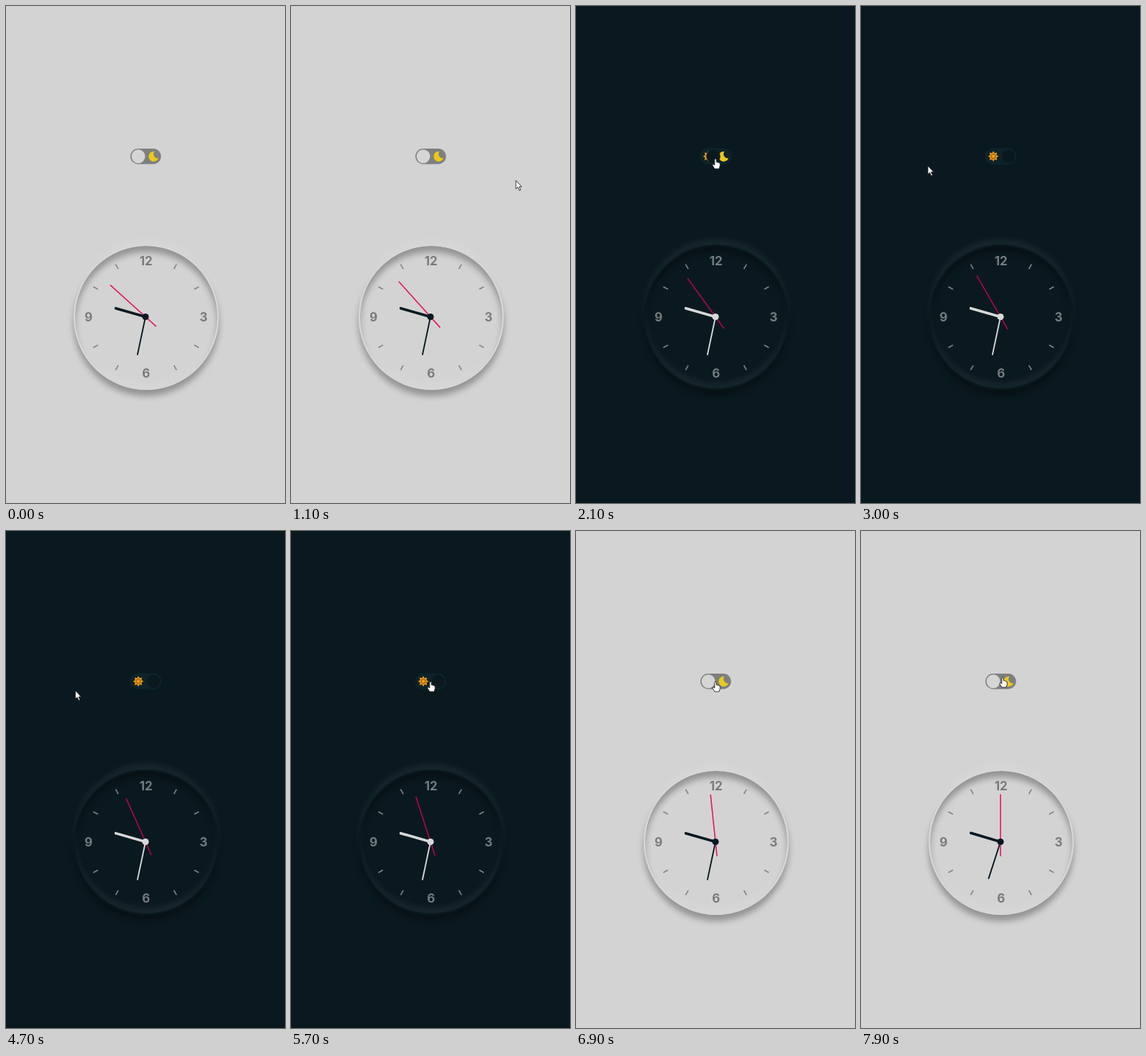
Write an HTML page that moves like this. It is 388x690 px and loops after 8000 ms.

```html
<!DOCTYPE html>
<html lang="en">
<head>
<meta charset="utf-8">
<title>Clock with theme switch</title>
<style>
  html, body { margin: 0; width: 100%; height: 100%; overflow: hidden; }
  body {
    --bg: #d3d3d3; --rim: #d8d8d8; --track: #7f7f7f; --ball: #d5d5d5; --edge: transparent;
    --hand: #091921; --second: #e2185f; --num: #7a7a7a; --tick: #858585;
    --glow: rgba(255, 255, 255, .08);
    position: relative; background: var(--bg);
  }
  body.dark {
    --bg: #0a1920; --rim: #0a1920; --track: #0d2329; --ball: #0a1920; --edge: #11282e;
    --hand: #d6d9da; --second: #b5044f; --num: #747c80; --tick: #7b8386;
    --glow: rgba(255, 250, 255, .055);
  }
  #face {
    position: absolute; left: 95.5px; top: 333px; width: 198px; height: 198px;
    margin: -2px; border: 2px solid var(--rim); border-radius: 50%; background: var(--bg);
    box-shadow: 0 -8.5px 8.5px var(--glow), inset 0 -8.5px 8.5px var(--glow),
      0 8.5px 8.5px rgba(0, 0, 0, .3), inset 0 8.5px 8.5px rgba(0, 0, 0, .3);
  }
  svg { position: absolute; left: 0; top: 0; display: block; }
  text { font: 700 17px Inter, "Open Sans", sans-serif; text-anchor: middle; fill: var(--num); }
  #ticks { stroke: var(--tick); stroke-width: 1.7; }
  #hour, #minute { stroke: var(--hand); stroke-linecap: round; }
  #arrow, #pointer { fill: #fff; stroke: #222; stroke-width: .9; stroke-linejoin: round; }
</style>
</head>
<body>
<div id="face"></div>
<svg width="388" height="690" viewBox="0 0 388 690">
  <rect x="173" y="198" width="42.6" height="21.4" rx="10.7" fill="var(--track)" stroke="var(--edge)" stroke-width=".8"/>
  <g transform="translate(184 208.7)">
    <path id="sun" fill="#f39a16"/>
    <circle r="3.1" fill="none" stroke="#704c1c" stroke-width="1"/>
  </g>
  <path d="M206.5 202A7 7 0 1 0 212 211.2A5.7 5.7 0 0 1 206.5 202Z" fill="#eac91c"/>
  <circle id="ball" cy="208.7" r="9.5" fill="var(--ball)" stroke="var(--edge)" stroke-width=".6"/>

  <g id="ticks"></g>
  <g id="numbers"></g>

  <g transform="translate(194 431.5)">
    <path id="hour" d="M0 0V-43" stroke-width="3.6"/>
    <path id="minute" d="M0 0V-53.5" stroke-width="1.9"/>
    <path id="second" d="M0 20V-66" stroke="var(--second)" stroke-width="1.6"/>
    <circle r="4.6" fill="var(--hand)"/>
  </g>

  <g id="cursor">
    <path id="arrow" d="M0 0V11.5L2.6 9.2L4.6 13.8L6.5 13L4.5 8.6H8Z"/>
    <path id="pointer" d="M-1.2 .8Q0 -.8 1.2 .8V4.8Q2.3 4.2 3 5.2Q4.2 4.6 4.8 5.8Q6.3 5.6 6.3 7V10L5 14H-1.2L-4 9.4Q-4.6 7.6 -3 7.6L-1.2 9Z"/>
  </g>
</svg>
<script>
  const LOOP = 8000, STEP = 100;
  const NIGHT = 2000, DAY = 5800, SLIDE = 300;
  const el = id => document.getElementById(id);

  const entry = { x: 390, y: 262 };
  const moves = [
    { from: 800, to: 1500, x: 194, y: 212 },
    { from: 2600, to: 3000, x: 93, y: 222 },
    { from: 4600, to: 5500, x: 194, y: 209 },
    { from: 7000, to: 7300, x: 283, y: 202 },
    { from: 7500, to: 7900, x: 197, y: 203 }
  ];

  const progress = (t, from, to) => Math.min(1, Math.max(0, (t - from) / (to - from)));
  const smooth = p => p * p * (3 - 2 * p);
  const turn = (id, deg) => el(id).setAttribute("transform", `rotate(${deg})`);

  el("sun").setAttribute("d", "M" + Array.from({ length: 16 }, (_, i) => {
    const r = i % 2 ? 4.7 : 7.4, a = i * Math.PI / 8;
    return `${(r * Math.sin(a)).toFixed(2)} ${(-r * Math.cos(a)).toFixed(2)}`;
  }).join("L") + "Z");

  for (let h = 1; h <= 12; h++) {
    const a = h * Math.PI / 6;
    if (h % 3) {
      el("ticks").innerHTML +=
        `<path d="M0 -77.3V-84.7" transform="translate(194.8 432) rotate(${h * 30})"/>`;
    } else {
      el("numbers").innerHTML +=
        `<text x="${194.8 + 80 * Math.sin(a)}" y="${438.4 - 78 * Math.cos(a)}">${h}</text>`;
    }
  }

  function cursorAt(t) {
    return moves.reduce((at, m) => {
      const p = smooth(progress(t, m.from, m.to));
      return { x: at.x + (m.x - at.x) * p, y: at.y + (m.y - at.y) * p };
    }, entry);
  }

  function draw(t) {
    document.body.classList.toggle("dark", t > NIGHT && t <= DAY);
    const slide = progress(t, NIGHT, NIGHT + SLIDE) - progress(t, DAY, DAY + SLIDE);
    el("ball").setAttribute("cx", 184 + 21 * slide);

    const s = 52 + Math.floor((t + 100) / 1000);
    const m = 32 + Math.floor(s / 60);
    turn("second", s * 6);
    turn("minute", m * 6);
    turn("hour", 270 + m / 2);

    const { x, y } = cursorAt(t);
    const over = x > 173 && x < 216 && y > 198 && y < 220;
    el("cursor").setAttribute("transform", `translate(${x} ${y})`);
    el("pointer").style.display = over ? "" : "none";
    el("arrow").style.display = over ? "none" : "";
  }

  const start = performance.now();
  function loop() {
    const t = (performance.now() - start) % LOOP;
    draw(Math.floor(t / STEP) * STEP);
    requestAnimationFrame(loop);
  }
  draw(0);
  loop();
</script>
</body>
</html>
```
